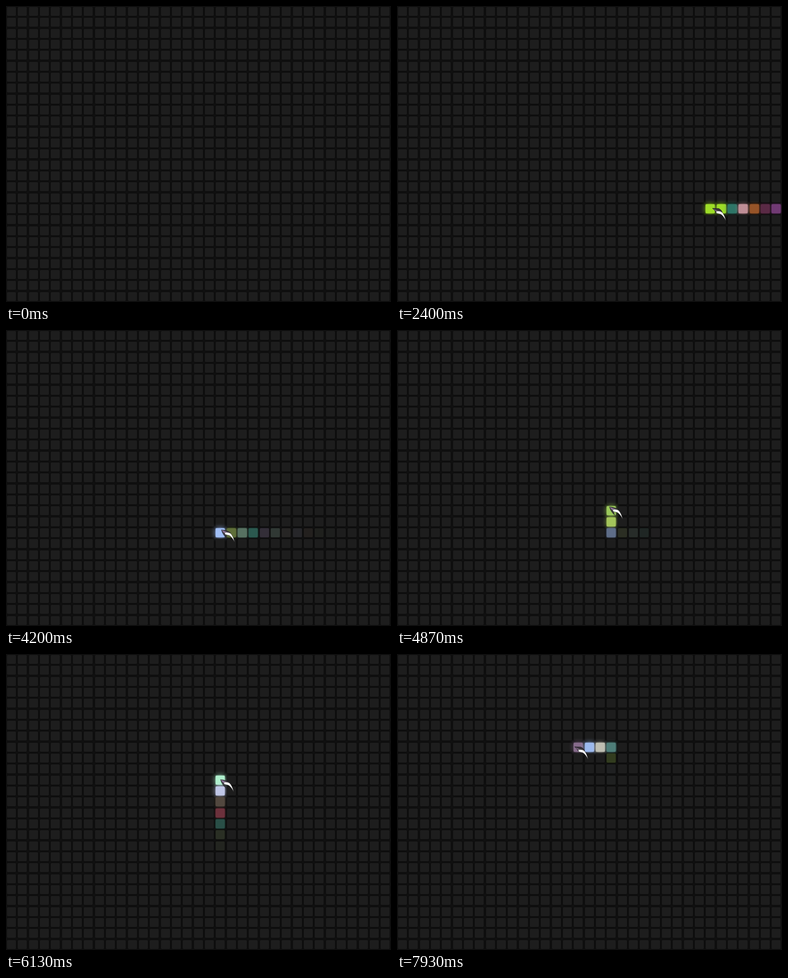
An HTML page for the animation above (8000 ms loop, 852 by 657 pixels).

```html
<!DOCTYPE html>
<html lang="en">
<head>
<meta charset="utf-8">
<title>Hover board</title>
<style>
  html, body { margin: 0; width: 100%; height: 100%; overflow: hidden; background: #111; }
  #board { position: relative; width: 852px; height: 657px; overflow: hidden; }
  .cell {
    position: absolute; width: 20px; height: 20px; border-radius: 2px;
    background: #1d1d1d; box-shadow: 0 0 2.4px #000;
  }
  #cursor { position: absolute; left: 0; top: 0; overflow: visible; visibility: hidden; }
  #cursor .up, #cursor.rising .side { display: none; }
  #cursor.rising .up { display: inline; }
</style>
</head>
<body>
<div id="board"></div>
<script>
const COLS = 35, ROWS = 27, PITCH = 24.335, INSET = 1.9, SIZE = 20, HOT = 3;
const LOOP = 8000, STEP = 1000 / 15, FADE = 2000, REST = 29;

// Pointer path: time, x, y
const path = [
  [1466, 845, 449], [1690, 827, 449], [2267, 723, 449], [2400, 698, 449],
  [3067, 579, 449], [3200, 558, 448], [3410, 534, 448], [3540, 510, 448],
  [3650, 486, 447], [4000, 478, 446], [4200, 476, 443], [4270, 475, 437],
  [4650, 472, 412], [4910, 469, 388], [5320, 467, 364], [5440, 467, 339],
  [5467, 467, 336], [5660, 469, 315], [5990, 473, 291], [6270, 475, 266],
  [6510, 474, 242], [6867, 471, 217], [7100, 470, 213], [7467, 468, 212],
  [7600, 452, 210], [7933, 393, 206]
];

// Hover colours in the order the cells are visited
const colors = (
  'f566fc 93376b d46f2e e4a8b1 2f7c6d 9ede28 9ede28 e87835 bdc4f9 8a766e ' +
  'afefcd 8b71a6 47d6b8 a2deba 93b04f a0bef5 b5da63 9bc95b 44bfa5 e2506a ' +
  '726253 c8d0f1 afefcd 395a64 9ede28 64a8a1 d6d6c8 a0bef5 866b8b'
).split(' ').map(h => [0, 2, 4].map(i => parseInt(h.substr(i, 2), 16)));

const board = document.getElementById('board');
const cells = [];
for (let i = 0; i < COLS * ROWS; i++) {
  const el = document.createElement('div');
  el.className = 'cell';
  el.style.left = (i % COLS) * PITCH + INSET + 'px';
  el.style.top = Math.floor(i / COLS) * PITCH + INSET + 'px';
  cells.push(board.appendChild(el));
}

board.insertAdjacentHTML('beforeend', `
  <svg id="cursor" width="32" height="30">
    <g class="side">
      <path d="M0 0L14 .5Q20 3 22 9L8 9Q5 4 0 0Z" fill="#39333c" stroke="#17151a" stroke-width=".8"/>
      <path d="M1 1L9 8L16 7Z" fill="#7d6580"/>
    </g>
    <g class="up">
      <path d="M0 0Q14 1 22 7L10 10L13 20Q3 12 0 0Z" fill="#302d33" fill-opacity=".9"/>
      <path d="M1 1L8 9L15 6Z" fill="#9479a0"/>
    </g>
    <path d="M8 6.5Q17 5 21.5 9Q27 15 30 28Q24 16 18 13L9 11Z" fill="#fff" stroke="#222" stroke-width=".6"/>
  </svg>`);
const cursor = document.getElementById('cursor');

function pointer(t) {
  if (t < path[0][0]) return null;
  const k = path.findIndex(p => p[0] > t);
  if (k < 0) return path[path.length - 1].slice(1);
  const a = path[k - 1], b = path[k], f = (t - a[0]) / (b[0] - a[0]);
  return [1, 2].map(i => a[i] + (b[i] - a[i]) * f);
}

function cellUnder([x, y]) {
  const px = x + HOT - INSET, py = y + HOT - INSET;
  const c = Math.floor(px / PITCH), r = Math.floor(py / PITCH);
  const inside = px - c * PITCH < SIZE && py - r * PITCH < SIZE;
  return inside && c < COLS ? r * COLS + c : -1;
}

// CSS "ease": cubic-bezier(.25, .1, .25, 1)
function ease(x) {
  if (x <= 0 || x >= 1) return x <= 0 ? 0 : 1;
  const curve = (u, a, b) => 3 * u * (1 - u) * ((1 - u) * a + u * b) + u ** 3;
  let lo = 0, hi = 1;
  for (let i = 0; i < 24; i++) {
    const mid = (lo + hi) / 2;
    if (curve(mid, .25, .25) < x) lo = mid; else hi = mid;
  }
  return curve(lo, .1, 1);
}

// Walk the path once to find when each cell is entered and left
const visits = new Map();
for (let t = 0; t < LOOP; t += 5) {
  const p = pointer(t), id = p ? cellUnder(p) : -1;
  if (id < 0) continue;
  if (!visits.has(id)) {
    visits.set(id, { el: cells[id], enter: t, rgb: colors[visits.size % colors.length] });
  }
  visits.get(id).leave = t + 5;
}

function paint({ el, enter, leave, rgb }, t) {
  const lit = t < enter ? 0 : 1 - ease((t - leave) / FADE);
  if (!lit) {
    el.style.background = el.style.boxShadow = '';
    return;
  }
  const fill = rgb.map(v => Math.round(REST + (v - REST) * lit));
  const edge = rgb.map(v => Math.round(v * lit));
  el.style.background = `rgb(${fill})`;
  el.style.boxShadow =
    `0 0 2.4px rgb(${edge}), 0 0 ${11 * lit}px rgba(${rgb},${lit})`;
}

let shown = -1;
function frame(now) {
  const n = Math.floor((now % LOOP + 4) / STEP);
  if (n !== shown) {
    shown = n;
    const t = n * STEP, p = pointer(t);
    visits.forEach(v => paint(v, t));
    cursor.style.visibility = p ? 'visible' : 'hidden';
    if (p) cursor.style.transform = `translate(${p[0]}px, ${p[1]}px)`;
    cursor.classList.toggle('rising', t > 4100 && t < 7500);
  }
  requestAnimationFrame(frame);
}
frame(performance.now());
</script>
</body>
</html>
```
